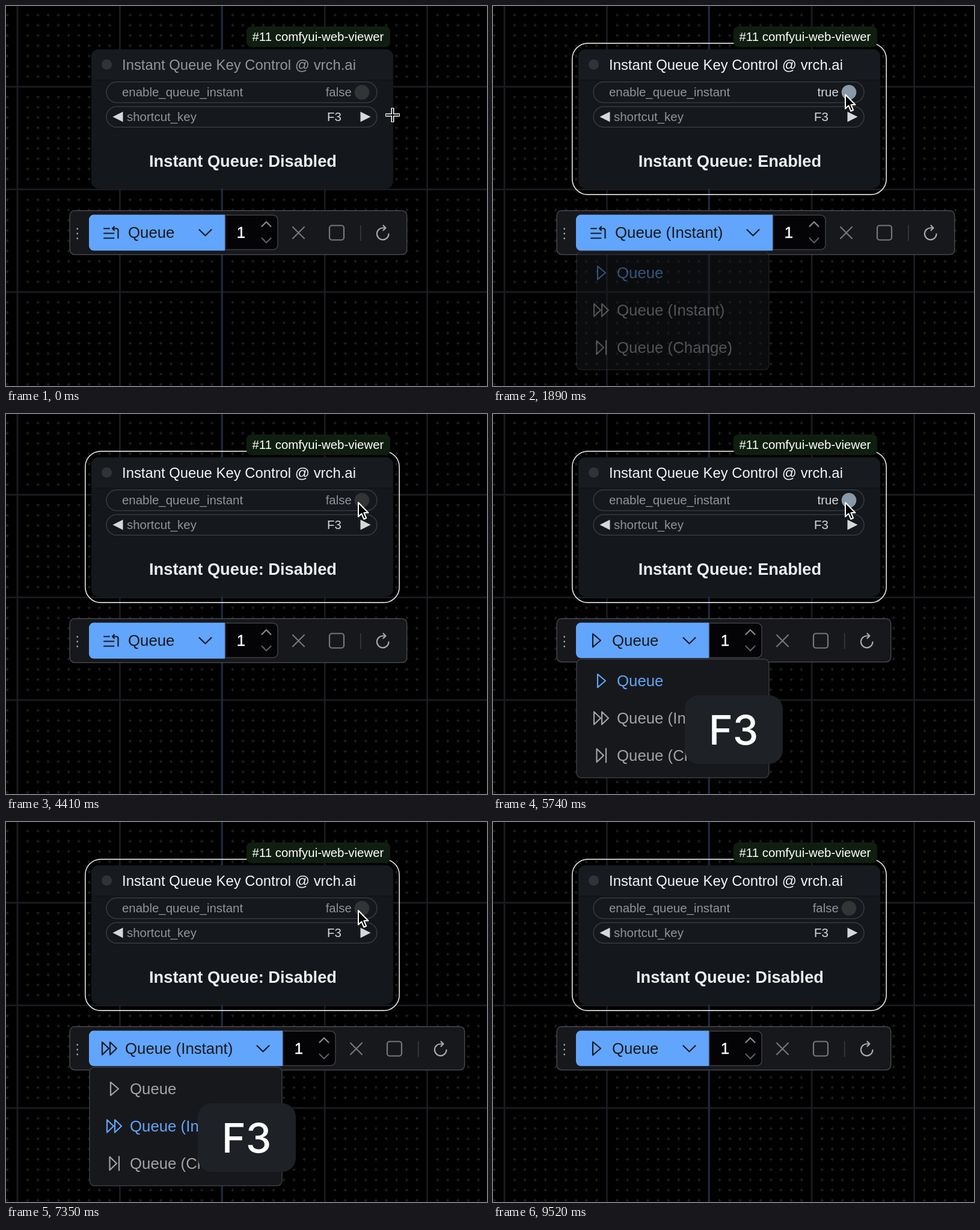
Recreate the animation shown at these times as an HTML page. Size 800 by 631 pixels, loop 9.59 s.

```html
<!DOCTYPE html>
<html lang="en">
<head>
<meta charset="utf-8">
<title>Instant queue key control</title>
<style>
  html, body { margin: 0; width: 100%; height: 100%; overflow: hidden; background: #000; }
  svg { display: block; width: 100%; height: 100%; }
  text { font-family: "Liberation Sans", Arial, sans-serif; font-size: 20.45px; white-space: pre; }
  .ui { font-size: 25.8px; }
  .line { fill: none; stroke: currentColor; stroke-width: 2.2; stroke-linecap: round; stroke-linejoin: round; }
  .end { text-anchor: end; }
  .mid { text-anchor: middle; }
  .pill { fill: #15191e; stroke: #373a3f; stroke-width: 1.6; }
</style>
</head>
<body>
<svg viewBox="0 0 800 631">
  <defs>
    <path id="play" class="line" d="M-6-11 7 0-6 11Z"/>
    <path id="forward" class="line" d="M-12-10.5-1 0-12 10.5ZM1-10.5 12 0 1 10.5Z"/>
    <path id="skip" class="line" d="M-7.5-11 4 0-7.5 11ZM8-11.5V11.5"/>
    <path id="list" class="line" d="M3.5 0H-13M3.5 8H-13M-4-8H-13M10.5 8V-5.5A2.5 2.5 0 0 0 8-8H1.5M4-5 1-8 4-11"/>
  </defs>

  <path id="marks" stroke="#222224" stroke-width="1.5"/>
  <path id="grid" stroke="#1b1c22" stroke-width="2.8"/>
  <path d="M359 0V631" stroke="#202a42" stroke-width="2.8"/>

  <g id="node">
    <rect x="142" y="72" width="502" height="231" rx="12" fill="#14171b"/>
    <path d="M142 123V84a12 12 0 0 1 12-12H632a12 12 0 0 1 12 12V123Z" fill="#171b20"/>
    <path d="M142 123H644" stroke="#101317" stroke-width="1.5"/>
    <circle cx="167.5" cy="97.3" r="8.5" fill="#313337"/>
    <text id="title" x="193" y="105.6" style="font-size:23.86px">Instant Queue Key Control @ vrch.ai</text>
    <rect class="pill" x="167" y="126" width="450" height="34.5" rx="17.2"/>
    <rect class="pill" x="167" y="167" width="450" height="34.3" rx="17.2"/>
    <g fill="#919497">
      <text x="193" y="150">enable_queue_instant</text>
      <text x="201" y="190.6">shortcut_key</text>
    </g>
    <text id="value" class="end" x="574.8" y="150"/>
    <circle id="knob" cx="592" cy="143.2" r="12.3"/>
    <g fill="#d6d8da">
      <text class="end" x="557.8" y="190.6">F3</text>
      <path d="M194.5 175.5 177.5 184 194.5 192.5ZM589.5 175.5 606.5 184 589.5 192.5Z"/>
    </g>
    <text id="status" class="mid" x="394" y="267" fill="#eceef0" style="font-size:27.26px;font-weight:bold"/>
    <rect id="outline" x="131.8" y="61.8" width="522.4" height="251.4" rx="26" fill="none" stroke="#dcdcdc" stroke-width="1.7"/>
    <rect x="400" y="34" width="239" height="34" rx="8" fill="#0f1f0f"/>
    <text x="409.5" y="58" fill="#fff">#11 comfyui-web-viewer</text>
  </g>

  <g id="toolbar">
    <rect id="bar" x="106.2" y="339.7" rx="8" fill="#17181b" stroke="#46474c" stroke-width="1.5"/>
    <path d="M118.7 370v0m0 8v0m0 8v0" stroke="#a5a5a8" stroke-width="2.8" stroke-linecap="round"/>
    <path id="button" fill="#62a5fd"/>
    <use id="modeIcon" color="#17191d"/>
    <text id="mode" class="ui" y="385" fill="#17191d"/>
    <g id="controls">
      <path class="line" color="#17191d" d="M-42.5 371.5-32.5 381.3-22.5 371.5"/>
      <path d="M.7 347.3H80a8 8 0 0 1 8 8V396.5a8 8 0 0 1-8 8H.7Z" fill="#040406" stroke="#3e3f44" stroke-width="1.5"/>
      <text class="ui mid" x="27" y="385" fill="#fff" stroke="#fff" stroke-width=".5">1</text>
      <path class="line" color="#8b8b8e" d="M61.5 366 69 358.5 76.5 366"/>
      <path class="line" color="#5f5f63" d="M61.5 385.5 69 393 76.5 385.5"/>
      <g color="#77777b">
        <path class="line" d="M113 367 132 386M132 367 113 386"/>
        <rect class="line" x="174" y="364.5" width="24" height="24" rx="4"/>
      </g>
      <path d="M225.8 364V390" stroke="#3b3c41" stroke-width="1.5"/>
      <path class="line" color="#a8a8ab" d="M272.5 378.5A9.8 9.8 0 1 1 263 368.5H267M263.5 364.5 267.5 368.5 263.5 372.5"/>
    </g>
  </g>

  <g id="menu">
    <rect id="menuBox" x="139" y="407" height="197" rx="8" fill="#17181b" stroke="#3b3c41" stroke-width="1.5"/>
    <g><use href="#play" x="180" y="443"/><text class="ui" x="206" y="452" fill="currentColor">Queue</text></g>
    <g><use href="#forward" x="180" y="505"/><text class="ui" x="206" y="514" fill="currentColor">Queue (Instant)</text></g>
    <g><use href="#skip" x="180" y="567"/><text class="ui" x="206" y="576" fill="currentColor">Queue (Change)</text></g>
  </g>

  <g id="keyBadge">
    <rect x="319" y="467" width="163" height="114" rx="23" fill="#1e2125"/>
    <text class="mid" x="400" y="549" fill="#fff" style="font-family:Inter,sans-serif;font-size:68px;font-weight:500">F3</text>
  </g>

  <circle id="ring" cx="588" cy="149.5" r="33.3" fill="none" stroke="#f05458" stroke-width="4.5"/>
  <path id="arrow" d="M0 0V23.5L5.4 18.4 9.3 27.5 13.2 25.8 9.4 17H16.5Z" stroke="#fff" stroke-width="2" stroke-linejoin="round"/>
  <g id="cross">
    <path d="M-12 0H12M0-12V12" stroke="#fff" stroke-width="5"/>
    <path d="M-11 0H11M0-11V11" stroke="#000" stroke-width="1.8"/>
  </g>
</svg>
<script>
const LOOP = 9590, STEP = 70;
const TOGGLES = [1050, 3010, 5530, 6860];
const OPEN = 90, GROW = 120, SELECT = 770, FADE = 140;   // menu timing, counted from a toggle
const KEY_DOWN = 5180, BADGE_FADE = 8260, BADGE_GONE = 8890;
const REST = [643, 181], TARGET = [586, 147];

const $ = id => document.getElementById(id);
const set = (id, attrs) => {
  for (const name in attrs) $(id).setAttribute(name, attrs[name]);
};
const show = (id, opacity) => { $(id).style.opacity = +opacity; };
const clamp = x => Math.min(1, Math.max(0, x));
const easeInOut = x => x * x * (3 - 2 * x);
const easeOut = x => 1 - (1 - x) ** 2.8;

function drawGrid() {
  const pitch = 17.04;
  let marks = '', lines = '';
  for (let i = -2; i < 48; i++) {
    const x = 19 + i * pitch, y = 134.2 + (i - 8) * pitch;
    if (i % 10 === 0) lines += `M${x} 0V631`;
    if ((i - 8) % 10 === 0) lines += `M0 ${y}H800`;
    for (let j = -8; j < 31; j++) {
      const my = 134.2 + j * pitch;
      if (i % 10 && j % 10) marks += `M${x - 2.5} ${my}h5M${x} ${my - 2.5}v5`;
    }
  }
  set('marks', { d: marks });
  set('grid', { d: lines });
}

function drawNode(t, enabled) {
  const selected = t >= TOGGLES[0];
  show('outline', selected);
  set('title', { fill: selected ? '#f4f5f6' : '#939699' });
  set('value', { fill: enabled ? '#d6d8da' : '#919497' });
  set('knob', { fill: enabled ? '#8899a8' : '#333435' });
  $('value').textContent = enabled;
  $('status').textContent = 'Instant Queue: ' + (enabled ? 'Enabled' : 'Disabled');
}

function drawToolbar(instant, listIcon) {
  const shift = listIcon ? 5 : 0;
  const right = (instant ? 460 : 359) + shift;
  const bottom = listIcon ? 406 : 405;
  set('bar', { width: right + 196.5, height: bottom - 333 });
  set('button', { d: `M${right} 346.6V${bottom + 0.3}H146a8 8 0 0 1-8-8V354.6a8 8 0 0 1 8-8Z` });
  set('modeIcon', {
    href: listIcon ? '#list' : instant ? '#forward' : '#play',
    x: listIcon ? 176 : 172, y: listIcon ? 377.5 : 376
  });
  set('mode', { x: 198 + shift });
  $('mode').textContent = instant ? 'Queue (Instant)' : 'Queue';
  set('controls', { transform: `translate(${right})` });
}

function drawMenu(since, instant) {
  const opening = clamp((since - OPEN) / GROW);
  const grown = easeOut(opening);
  show('menu', since < SELECT ? grown : clamp(1 - (since - SELECT) / FADE));
  set('menu', { transform: `translate(0 407) scale(1 ${0.8 + 0.2 * grown}) translate(0 -407)` });
  set('menuBox', { width: opening < 1 ? 324.5 : 320 });
  [...$('menu').querySelectorAll('g')].forEach((item, i) =>
    item.setAttribute('color', i === +instant ? '#60a5fa' : '#a3a3a6'));
}

function drawPointer(t, since) {
  const progress = t < 5000
    ? easeInOut(clamp((t - 70) / 770))
    : 1 - easeInOut(clamp((t - 9310) / 210));
  const [x, y] = REST.map((r, i) => r + (TARGET[i] - r) * progress);
  const crossed = t < 210;
  for (const id of ['arrow', 'cross']) set(id, { transform: `translate(${x} ${y})` });
  show('cross', crossed);
  show('arrow', !crossed && t < 9520);
  show('ring', t < KEY_DOWN ? clamp(1 - since / 280) : 0);
}

function draw(now) {
  const t = Math.floor((now % LOOP) / STEP) * STEP;
  const past = TOGGLES.filter(at => at <= t);
  const since = past.length ? t - past.at(-1) : Infinity;
  const enabled = past.length % 2 === 1;
  const instant = TOGGLES.filter(at => at + SELECT <= t).length % 2 === 1;
  const highlighted = since < Infinity && !enabled;   // the menu keeps the previous mode lit

  drawNode(t, enabled);
  drawToolbar(instant, t < KEY_DOWN);
  drawMenu(since, highlighted);
  drawPointer(t, since);
  show('keyBadge', t < KEY_DOWN ? 0 : clamp((BADGE_GONE - t) / (BADGE_GONE - BADGE_FADE)));
}

drawGrid();
const start = performance.now();
(function frame() {
  draw(performance.now() - start);
  requestAnimationFrame(frame);
})();
</script>
</body>
</html>
```
